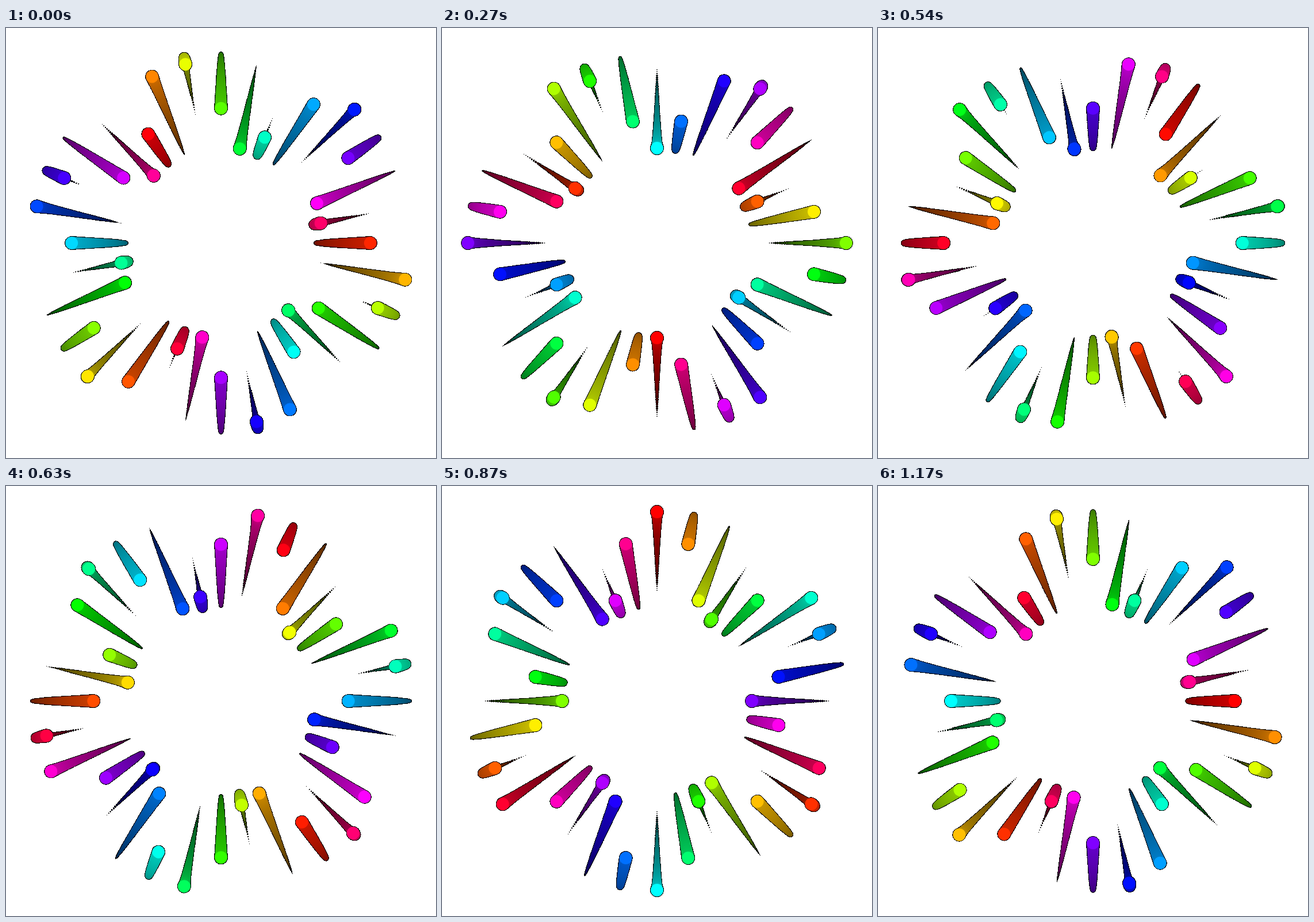
An HTML page with a canvas that plays this animation: 748 by 748 pixels, repeating every 1200 ms.

```html
<!DOCTYPE html>
<html lang="en">
<head>
<meta charset="utf-8">
<title>Radial wave</title>
<style>
  html, body { margin: 0; width: 100%; height: 100%; overflow: hidden; background: #fff; }
  canvas { display: block; width: 100vmin; height: 100vmin; }
</style>
</head>
<body>
<canvas id="stage" width="748" height="748"></canvas>
<script>
const ctx = document.getElementById('stage').getContext('2d', { willReadFrequently: true });
const SIZE = 748, CENTER = SIZE / 2;
const RAYS = 32, STEPS = 40, STEP_MS = 30;
const MID = 247, SWING = 82, HEAD = 11.5, HALF_LINE = 0.5;
const TRAIL = 135, TRAIL_GAP = 3; // degrees of phase
const rad = deg => deg * Math.PI / 180;

function dot(distance, radius, color) {
  if (radius <= 0) return;
  ctx.fillStyle = color;
  ctx.beginPath();
  ctx.arc(distance, 0, radius, 0, 2 * Math.PI);
  ctx.fill();
}

function drawRay(index, turn) {
  const phase = turn + index * 67.5;
  const hue = (turn + index * 33.75) % 360;
  const distance = lag => MID + SWING * Math.sin(rad(phase - lag));
  const radius = lag => HEAD * (1 - lag / TRAIL);

  ctx.save();
  ctx.translate(CENTER, CENTER);
  ctx.rotate(rad(index * 360 / RAYS));
  for (let lag = TRAIL; lag >= 0; lag -= TRAIL_GAP) {
    dot(distance(lag), radius(lag) + HALF_LINE, '#000');
  }
  for (let lag = TRAIL; lag >= 0; lag -= TRAIL_GAP) {
    const value = lag ? 0.78 - 0.53 * lag / TRAIL : 1;
    dot(distance(lag), radius(lag) - HALF_LINE, `hsl(${hue}, 100%, ${value * 50}%)`);
  }
  ctx.restore();
}

// Gives the shapes hard, stepped edges.
function hardenEdges() {
  const image = ctx.getImageData(0, 0, SIZE, SIZE);
  const data = image.data;
  for (let i = 3; i < data.length; i += 4) data[i] = data[i] < 128 ? 0 : 255;
  ctx.putImageData(image, 0, 0);
}

function render(step) {
  const turn = (step + 1) * 360 / STEPS;
  ctx.clearRect(0, 0, SIZE, SIZE);
  for (let i = 0; i < RAYS; i++) drawRay(i, turn);
  hardenEdges();
}

const start = performance.now();
let shown = -1;
function tick() {
  const step = Math.floor((performance.now() - start) / STEP_MS) % STEPS;
  if (step !== shown) render(shown = step);
  requestAnimationFrame(tick);
}
tick();
</script>
</body>
</html>
```
